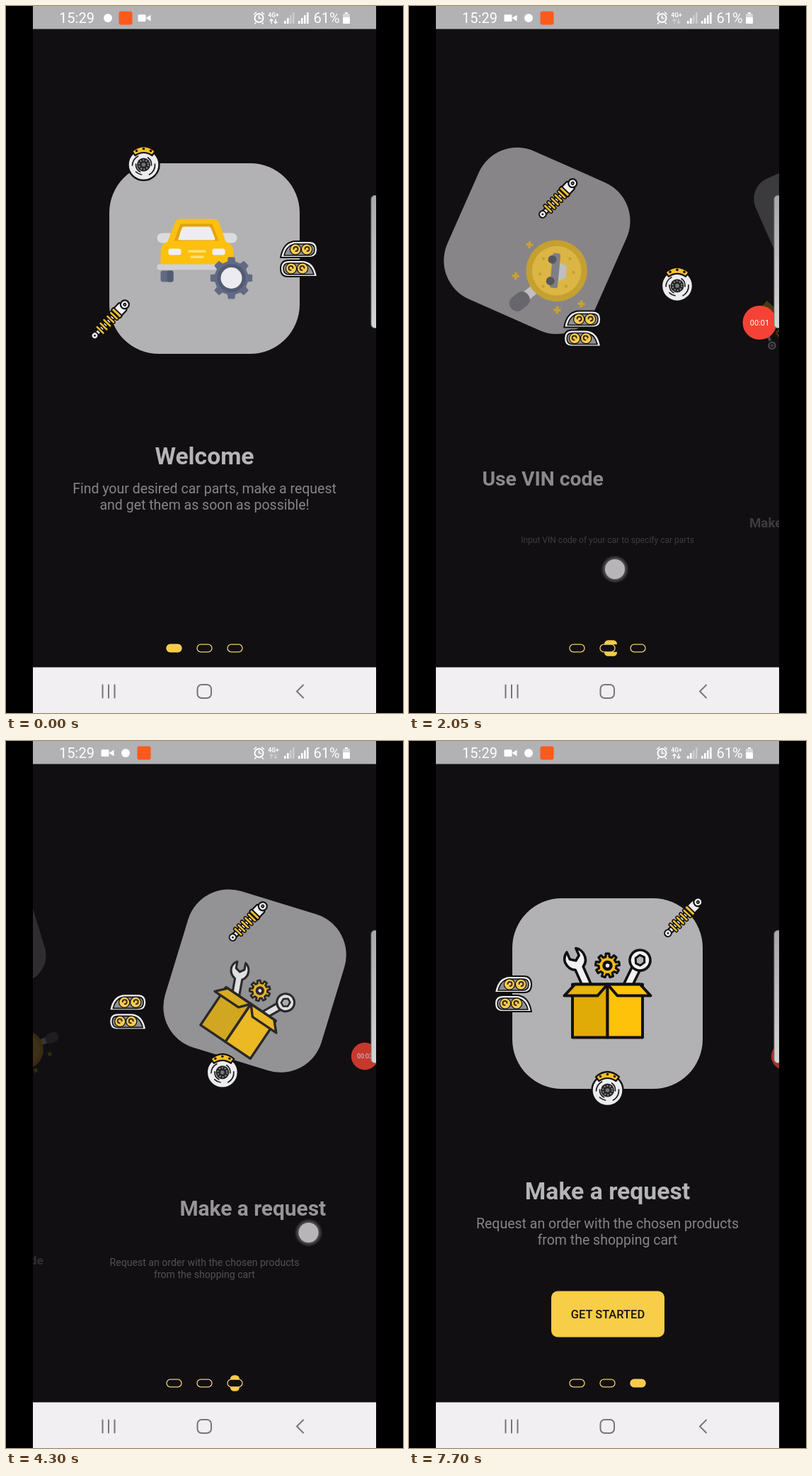
Write an HTML page that moves like this. It is 561 px wide and 998 px high and loops after 7.8 s.

```html
<!DOCTYPE html>
<html lang="en">
<head>
<meta charset="utf-8">
<title>Onboarding</title>
<style>
  html, body { margin: 0; width: 100%; height: 100%; overflow: hidden; background: #000; }
  svg { display: block; width: 561px; height: 998px; font-family: Roboto, sans-serif; }
  .ink { stroke: #111; stroke-linejoin: round; stroke-linecap: round; }
  .title { font-size: 33.7px; font-weight: 700; fill: #b5b4b7; }
  .sub { font-size: 19.5px; fill: #858487; }
  text { text-anchor: middle; }
</style>
</head>
<body>
<svg id="stage" viewBox="0 0 561 998" xmlns="http://www.w3.org/2000/svg"></svg>
<script>
const LOOP = 7800, STEP = 50, CX = 280.5, CY = 356.5, BG = '#110f11';

// ---------- drawing helpers ----------
const rect = (x, y, w, h, r, fill, more = '') =>
  `<rect x="${x}" y="${y}" width="${w}" height="${h}" rx="${r}" fill="${fill}" ${more}/>`;
const disc = (x, y, r, fill, more = '') => `<circle cx="${x}" cy="${y}" r="${r}" fill="${fill}" ${more}/>`;
const path = (d, fill, more = '') => `<path d="${d}" fill="${fill}" ${more}/>`;
const line = (d, color, w, more = '') =>
  path(d, 'none', `stroke="${color}" stroke-width="${w}" stroke-linecap="round" stroke-linejoin="round" ${more}`);
const ink = w => `class="ink" stroke-width="${w}"`;

function gear(x, y, outer, inner, teeth, fill, more) {
  const pts = [];
  for (let i = 0; i < teeth; i++) {
    [[-.3, inner], [-.2, outer], [.2, outer], [.3, inner]].forEach(([k, r]) => {
      const a = (i + k) * 2 * Math.PI / teeth;
      pts.push((x + r * Math.sin(a)).toFixed(1) + ',' + (y - r * Math.cos(a)).toFixed(1));
    });
  }
  return path('M' + pts.join('L') + 'Z', fill, more);
}

// ---------- page icons ----------
const car =
  rect(-67, -36, 113, 14, 7, '#dcdbdf') +
  rect(-62, 17, 18, 16, 3, '#626a83') + rect(-53, 17, 9, 16, 3, '#535b74') +
  path('M-33-56H12Q19-56 21-50L30-24Q41-20 41-10V10H-62V-10Q-62-20-52-24L-42-50Q-40-56-33-56Z', '#fdc00f') +
  path('M-34-49H11L20-25H-43Z', '#e3a40b') +
  path('M-29-45H6Q8-45 9-43L15-28Q15-26 13-26H-35Q-38-26-37-28L-32-43Q-31-45-29-45Z', '#eeedf1') +
  rect(-51, -14, 18, 9, 3, '#f0eff3') + rect(11, -14, 18, 9, 3, '#f0eff3') +
  rect(-23, -12, 25, 3.5, 1.5, '#ffe07a') + rect(-20, -4, 19, 3.5, 1.5, '#ffe07a') +
  rect(-67, 8, 104, 8, 3, '#d1d0d5') +
  gear(38, 27.5, 30, 24, 8, '#626a83') + disc(38, 27.5, 20, '#535b74') + disc(38, 27.5, 15, '#ecebef');

const plus = (x, y) => line(`M${x - 6} ${y}h12M${x} ${y - 6}v12`, '#e3ab12', 4, 'style="stroke-linecap:butt"');
const lens =
  `<g transform="translate(-10 -10)"><g transform="rotate(45)">${rect(48, -8, 20, 16, 0, '#d6d5d9')}` +
  `${rect(62, -13, 36, 26, 12, '#5c5b62')}</g>` +
  disc(0, 0, 51, '#dcaa12') + disc(0, 0, 41, '#fbc92d') +
  [[-22, -20], [0, -28], [24, -18], [-18, 24], [8, 27], [28, 20]].map(([x, y]) => disc(x, y, 2.6, '#dcaa12')).join('') +
  path('M-15-2L-9-16H10L19-2Z', '#d4d3d9') + rect(-29, -4, 58, 13, 4, '#7d7c85') +
  disc(-18, 9, 7, '#45474f') + disc(18, 9, 7, '#45474f') +
  plus(-39, 49) + plus(15, 67) + plus(51, -46) + plus(65, -7) + '</g>';

const box =
  `<g transform="translate(-46 -47) rotate(-24)">${path('M-5 13V46H7V13Q16 8 15-3Q14-11 8-15V-4L1 1L-6-4V-15Q-13-11-14-3Q-14 8-5 13Z', '#f2f1f4', ink(3.6))}</g>` +
  `<g transform="translate(46 -47) rotate(26)">${rect(-6, 8, 12, 40, 0, '#f2f1f4', ink(3.6))}${disc(0, 0, 14.5, '#f2f1f4', ink(3.6))}` +
  `${path('M-7 0L-3.5-6.5H3.5L7 0L3.5 6.5H-3.5Z', '#b2b1b3', ink(3))}</g>` +
  gear(0, -39.5, 17, 12.5, 9, '#f7bd13', ink(3.2)) + disc(0, -39.5, 5, '#f4f3f5', ink(4.5)) +
  rect(-49.5, -13, 49.5, 75, 0, '#e0ab06', ink(4)) + rect(0, -13, 49.5, 75, 0, '#ffc20a', ink(4)) +
  path('M-61 3L-46-13H0L-14 3Z', '#e9b308', ink(4)) + path('M61 3L46-13H0L14 3Z', '#ffc20a', ink(4));

// ---------- floating parts ----------
const brake =
  disc(0, 2, 22, '#ecebee', ink(2.4)) +
  line('M-16 3A16 16 0 0 1-8-10M16 1A16 16 0 0 1 8 16M-11 12A15 15 0 0 0-3 16M-11 1A12 12 0 0 0-5 12M11 3A12 12 0 0 0 6-8', '#1c1c1c', 1.7) +
  disc(0, 2, 9.5, '#232323') + disc(0, 2, 6.5, 'none', 'stroke="#999" stroke-width="1.8" stroke-dasharray="2 2.1"') +
  disc(0, 2, 2.8, '#777') +
  path('M-16.5-17Q0-31 16.5-17L12-11Q0-19-12-11Z', '#fbc02a', ink(2.2)) +
  [[-10, -17.5], [0, -20.5], [10, -17.5]].map(([x, y]) => disc(x, y, 1.8, '#151515')).join('');

const lampUnit =
  path('M-26-2Q-22-25-4-25H15Q26-25 26-13.5Q26-2 16-2Z', '#f1f0f3', ink(2)) +
  path('M-21-5Q-17-21-3-21H14Q22-21 22-13.5Q22-5 14-5Z', '#8f8e93', ink(1.6)) +
  [-5, 11].map(x => disc(x, -13.5, 7.6, '#fbcb55', ink(1.2)) +
    line(`M${x - 2.5}-14a3 3 0 1 1 3 3`, '#3a2c0c', 2)).join('');
const lamps = lampUnit + `<g transform="translate(0 27) scale(-1 1)">${lampUnit}</g>`;

const shock = '<g transform="rotate(-46)">' +
  rect(-30, -3.5, 50, 7, 2, '#f1f0f3', ink(2.2)) +
  [-22, -15, -8, -1, 6].map(x => rect(x, -8, 4, 16, 2, '#fbc02a', ink(1.5))).join('') +
  rect(13, -7.5, 14, 15, 2, '#f1f0f3', ink(2.2)) + rect(11, -8.5, 5, 17, 1.5, '#fbc02a', ink(2)) +
  disc(-31, 0, 4.8, '#f1f0f3', ink(2)) + disc(-31, 0, 1.4, '#151515') +
  disc(30, 0, 6, '#f1f0f3', ink(2.2)) + disc(30, 0, 1.8, '#8a898d', ink(1.5)) + '</g>';

// Each path: three page positions and a sideways bulge on the first leg.
const parts = [
  { art: lamps, at: [[414, 357], [280.5, 491], [147, 357]], bulge: [79, 78] },
  { art: shock, at: [[147, 443], [146.5, 280], [387.5, 249]], bulge: [-43, 0] },
  { art: brake, at: [[194.5, 222], [414.5, 357.5], [280.5, 491]], bulge: [92, -101] }
];

// reach: title travel per page to the left / right; shrink: icon and card scale loss; spin: icon degrees.
const pages = [
  { title: 'Welcome', sub: ['Find your desired car parts, make a request', 'and get them as soon as possible!'],
    icon: car, reach: [311, 361], shrink: [.75, .75], spin: 360, iconX: 307 },
  { title: 'Use VIN code', sub: ['Input VIN code of your car to specify car parts'],
    icon: lens, reach: [345, 388], shrink: [.57, .75], spin: 360, iconX: 306 },
  { title: 'Make a request', sub: ['Request an order with the chosen products', 'from the shopping cart'],
    icon: box, reach: [361, 361], shrink: [.75, .75], spin: 180, iconX: 314 }
];

const dots = [237.5, 280.5, 323.5];
const pageArt = (p, i) =>
  `<g id="card${i}">${rect(-134.5, -134.5, 269, 269, 70, '#b2b1b3')}</g>` +
  `<g id="icon${i}">${p.icon}</g>` +
  `<g id="title${i}"><text class="title" y="12">${p.title}</text></g>` +
  `<g id="sub${i}">${p.sub.map((s, k) => `<text class="sub" y="${(p.sub.length > 1 ? -4.5 : 7) + 23 * k}">${s}</text>`).join('')}</g>`;

document.getElementById('stage').innerHTML =
  `<defs><clipPath id="screen"><rect x="38" y="0" width="485" height="998"/></clipPath>
   <radialGradient id="glow"><stop offset=".55" stop-color="#fff" stop-opacity=".5"/><stop offset="1" stop-color="#fff" stop-opacity="0"/></radialGradient>
   <linearGradient id="tip" x1="0" y1="0" x2="0" y2="1"><stop offset="0" stop-color="#a9a8aa"/><stop offset="1" stop-color="#d5d4d6"/></linearGradient></defs>` +
  rect(0, 0, 561, 998, 0, '#000') + '<g clip-path="url(#screen)">' + rect(38, 0, 485, 998, 0, BG) +
  pages.map(pageArt).join('') +
  parts.map((p, i) => `<g id="part${i}">${p.art}</g>`).join('') +
  `<g id="button">${rect(-80, -32.5, 160, 65, 9, '#f8cd47')}<text y="6" font-size="16.5" font-weight="500" fill="#141214">GET STARTED</text></g>` +
  `<rect id="pill" rx="5.3" fill="#f9cb45"/><rect id="slot" y="901.2" height="10.6" fill="${BG}"/>` +
  dots.map((x, i) => rect(x - 10.5, 901.2, 21, 10.6, 5.2, BG, `id="dot${i}" stroke="#efd073" stroke-width="1.3"`)).join('') +
  // status bar
  rect(38, 0, 485, 32.5, 0, '#b2b1b3') +
  '<g fill="#fff"><text x="100" y="24" font-size="20">15:29</text><text x="453" y="24" font-size="20">61%</text>' +
  '<text x="378" y="15.5" font-size="8.5" font-weight="700">4G+</text></g>' +
  `<g id="app">${disc(0, 17, 6, '#fff')}</g><g id="rec">${rect(-9.5, 7.5, 19, 19, 3, '#fb5a1c')}</g>` +
  `<g id="cam">${rect(-9, 12, 11, 10, 1.5, '#fff')}${path('M2 17L9 12.5V21.5Z', '#fff')}</g>` +
  disc(357.5, 17, 6, 'none', 'stroke="#fff" stroke-width="2"') + line('M357.5 13.5V17.5H360.5M350.5 11.5L353.5 9M364.5 11.5L361.5 9M353 23.5L351.5 25M362 23.5L363.5 25', '#fff', 1.6) +
  `<g id="data">${line('M375 24.5V18.5M373 20.5L375 18.5L377 20.5M381 18.5V24.5M379 22.5L381 24.5L383 22.5', '#fff', 1.4)}</g>` +
  [393, 413].map((x, k) => [0, 1, 2, 3].map(i =>
    rect(x + i * 4, 21 - i * 4, 2.6, 4 + i * 4, 0, '#fff', `opacity="${i < (k ? 4 : 2) ? 1 : .35}"`)).join('')).join('') +
  rect(476, 11, 10, 14, 1.5, '#fff', 'opacity=".5"') + rect(476, 16, 10, 9, 1.5, '#fff') + rect(479, 9, 4, 2, 0, '#fff') +
  // navigation bar
  rect(38, 933.5, 485, 65, 0, '#f1eff2') +
  line('M136.5 958.5V976.5M145 958.5V976.5M153.5 958.5V976.5M420 958.5L411 967.5L420 976.5', '#77757a', 2) +
  rect(270.5, 958, 19.5, 19, 6, 'none', 'stroke="#77757a" stroke-width="2"') +
  `<g id="timer">${disc(0, 0, 24, '#f44336')}<text id="clock" y="4" font-size="11" fill="#fff"></text></g>` +
  rect(516, 267.5, 14, 187, 5, 'url(#tip)', 'stroke="#77767a" stroke-width="1"') +
  `<g id="finger">${disc(0, 0, 20, 'url(#glow)')}${disc(0, 0, 14, '#c9c8ca')}</g></g>`;

const ui = {};
document.querySelectorAll('#stage [id]').forEach(e => ui[e.id] = e);

// ---------- motion ----------
// Monotone cubic through [t, value] keys.
function track(keys, t) {
  const n = keys.length - 1;
  if (t <= keys[0][0]) return keys[0][1];
  if (t >= keys[n][0]) return keys[n][1];
  let i = 0;
  while (keys[i + 1][0] < t) i++;
  const slope = k => k < 0 || k >= n ? 0 : (keys[k + 1][1] - keys[k][1]) / (keys[k + 1][0] - keys[k][0]);
  const tangent = k => { const a = slope(k - 1), b = slope(k); return a * b > 0 ? 2 * a * b / (a + b) : 0; };
  const [t0, a] = keys[i], [t1, b] = keys[i + 1], h = t1 - t0, u = (t - t0) / h, v = 1 - u;
  return a * v * v * (1 + 2 * u) + b * u * u * (3 - 2 * u) + h * u * v * (tangent(i) * v - tangent(i + 1) * u);
}

const scroll = [[400, 0], [500, .1], [650, .387], [800, .6], [1000, .82], [1175, .91], [1450, 1],
  [1700, 1], [1850, 1.08], [2050, 1.265], [2400, 1.43], [2750, 1.56], [3000, 1.73], [3200, 1.844], [3450, 1.95], [3750, 2],
  [4000, 2], [4300, 1.811], [4800, 1.7], [5400, 1.612], [5700, 1.58], [6000, 1.72], [6350, 1.87], [6700, 2]];
const touches = [
  [[400, 435, 800], [650, 247.5, 814], [700, 215, 816]],
  [[1700, 419, 810], [2050, 291, 795], [2750, 170, 785]],
  [[4000, 336, 705], [4300, 427.5, 694], [5400, 494, 676.5], [5700, 505, 674]]
];
const pillW = [[0, 21.5], [.08, 14], [.156, 11.5], [.189, 13], [.265, 18], [.387, 28], [.5, 32]];
const pillH = [[0, 10.6], [.12, 22.5], [.5, 22.5]];
const pillX = [[0, 0], [.18, 0], [.265, .105], [.387, .29], [.5, .5]];
const timerX = [[2500, 495.5], [2800, 507], [4800, 507], [5100, 531]];

const setAll = (e, attrs) => { for (const k in attrs) e.setAttribute(k, attrs[k]); };
const place = (e, x, y, s = 1, rot = 0, alpha = 1) => setAll(e, {
  transform: `translate(${x} ${y}) rotate(${rot}) scale(${Math.max(.01, s)})`,
  opacity: Math.max(0, alpha)
});

function drawPage(page, i, pos) {
  const d = i - pos, m = Math.abs(d), right = d > 0 ? 1 : 0, fade = 1 - m;
  const s = 1 - page.shrink[right] * m;
  place(ui['card' + i], CX + 376 * d, CY - 94.5 * m, s, 90 * m, fade);
  place(ui['icon' + i], CX + page.iconX * d, CY + (right ? 127 : 94) * m, s, page.spin * m, fade);
  place(ui['title' + i], CX + page.reach[right] * d, 635 + (right ? 128 : 121) * m, 1 - .603 * m, 0, fade);
  place(ui['sub' + i], CX, (page.sub.length > 1 ? 692.5 : 681) + 276 * m, 1 - m * (1.53 - .32 * m), 0, 1 - 2.35 * m);
}

// The moving pill is hollow along the row of dots; at rest it fills its dot.
function drawPill(pos) {
  const near = Math.round(pos), f = pos - near, m = Math.abs(f), moving = m > .01;
  const w = track(pillW, m), h = track(pillH, m), x = dots[near] + Math.sign(f) * 43 * track(pillX, m) - w / 2;
  setAll(ui.pill, { x, y: 906.5 - h / 2, width: w, height: h });
  setAll(ui.slot, { x, width: w, opacity: moving ? 1 : 0 });
  dots.forEach((_, i) => ui['dot' + i].setAttribute('fill', moving || i !== near ? BG : '#f9cb45'));
}

function draw(t) {
  const pos = track(scroll, t);
  pages.forEach((p, i) => drawPage(p, i, pos));

  const leg = pos < 1 ? 0 : 1, u = pos - leg, bow = leg ? 0 : 4 * u * (1 - u);
  parts.forEach((p, i) => {
    const [x, y] = [0, 1].map(k => p.at[leg][k] + (p.at[leg + 1][k] - p.at[leg][k]) * u + p.bulge[k] * bow);
    place(ui['part' + i], x, y);
  });

  const away = 2 - pos;
  place(ui.button, 281, 809 + 180 * away, 1 - 2 * away, 0, 1 - 7 * away);
  drawPill(pos);

  const moved = t >= 1000;
  place(ui.app, moved ? 169 : 144, 0);
  place(ui.rec, moved ? 195 : 169, 0);
  place(ui.cam, moved ? 143.5 : 195.5, 0, 1, 0, moved || t < 100 ? 1 : 0);
  ui.data.setAttribute('opacity', t < 400 || t >= 7600 ? 1 : .4);

  const dock = Math.min(1, Math.max(0, (t - 2500) / 300));
  place(ui.timer, track(timerX, t), 447 - 2 * dock, 1 - .2 * dock, 0, t < 500 ? 0 : 1 - .2 * dock - (t > 5000 ? .15 : 0));
  ui.clock.textContent = '00:0' + Math.max(0, Math.floor((t - 400) / 1000));

  const touch = touches.find(k => t >= k[0][0] && t < k[k.length - 1][0]);
  if (touch) {
    const left = touch[touch.length - 1][0] - t;
    place(ui.finger, track(touch, t), track(touch.map(k => [k[0], k[2]]), t), 1, 0, .9 * Math.min(1, left / 90));
  } else ui.finger.setAttribute('opacity', 0);
}

const start = performance.now();
function tick() {
  const t = (performance.now() - start) % LOOP;
  draw(t - t % STEP);
  requestAnimationFrame(tick);
}
tick();
</script>
</body>
</html>
```
